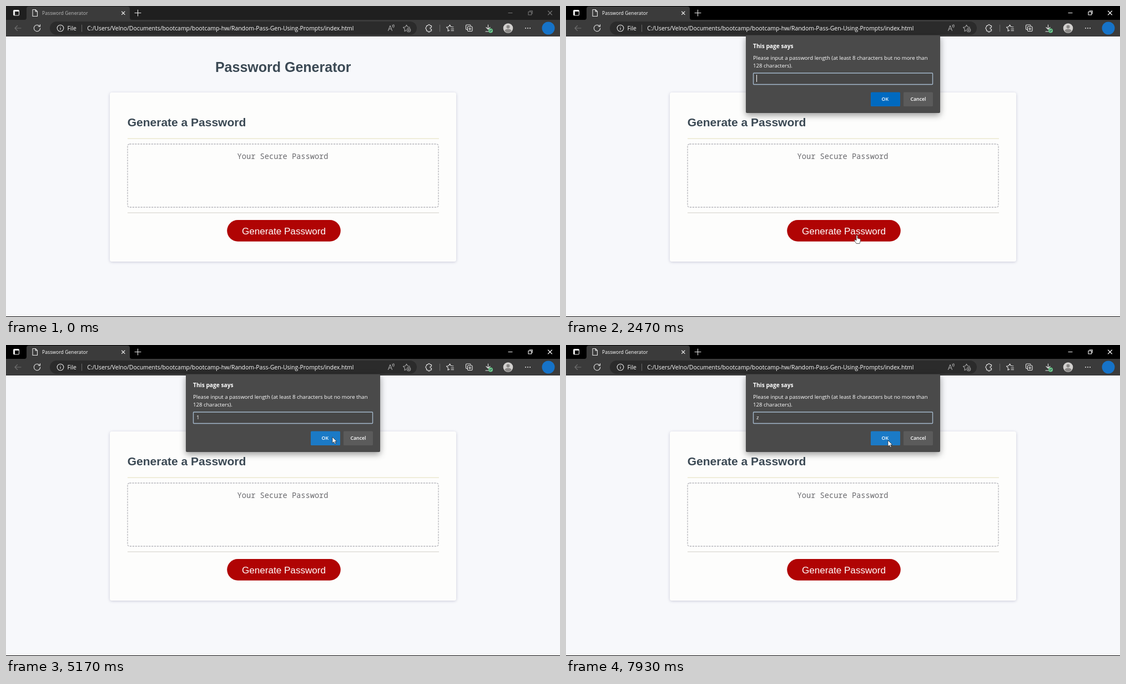
Recreate the animation shown at these times as an HTML page. Size 998 by 561 pixels, loop 8 s.

```html
<!DOCTYPE html>
<html lang="en">
<head>
<meta charset="utf-8">
<title>Password Generator</title>
<style>
  html, body { margin: 0; height: 100%; overflow: hidden; background: #f7f8fb; }
  svg { display: block; width: 100vw; height: 100vh; }
  text { font-family: "Open Sans", "Noto Sans", sans-serif; fill: #fff; white-space: pre; }
  .arial { font-family: "Liberation Sans", Arial, sans-serif; }
  .heading { font-weight: bold; fill: #3b4954; }
  .mono { font: 13.67px "Noto Sans Mono", "DejaVu Sans Mono", monospace; fill: #6a6a6e; }
  .mid { text-anchor: middle; }
  .line { fill: none; stroke: #e8e8e8; stroke-width: 1.1; stroke-linecap: round; stroke-linejoin: round; }
  .dim { stroke: #a4a4a4; }
  .off { stroke: #707070; }
  .dialog { filter: drop-shadow(0 4px 6px rgba(0, 0, 0, .4)); }
  .dialog text { font-size: 9.58px; }
  .dialog .title { font-size: 10.2px; font-weight: bold; }
  .dialog .label { font-size: 8.8px; font-weight: 600; text-anchor: middle; }
</style>
</head>
<body>
<svg viewBox="0 0 998 561" preserveAspectRatio="none">
  <!-- page -->
  <rect width="998" height="561" fill="#f7f8fb"/>
  <text class="arial heading mid" x="499.2" y="118.6" font-size="25">Password Generator</text>
  <rect x="187" y="156" width="624" height="305" rx="3.5" fill="#fdfdfc"
        style="filter:drop-shadow(0 1px 2.5px rgba(60,60,110,.24))"/>
  <text class="arial heading" x="218.7" y="216.6" font-size="21">Generate a Password</text>
  <path d="M219 239.300H780" stroke="#ebe8d0" stroke-width="1.5"/>
  <path d="M219 373H780" stroke="#e1dfd8" stroke-width="1.3"/>
  <rect x="219" y="249" width="560" height="114" rx="3.5" fill="none" stroke="#b5b5bb"
        stroke-width="1.3" stroke-dasharray="3.2 1.7"/>
  <text class="mono" x="416.6" y="275.5">Your Secure Password</text>
  <rect x="398.2" y="386" width="204.6" height="38.7" rx="19.35" fill="#b00404"/>
  <text class="arial mid" x="500.5" y="411.5" font-size="17.1">Generate Password</text>
  <rect y="560" width="998" height="1" fill="#050505"/>

  <!-- title bar -->
  <rect id="titleBar" width="998" height="26"/>
  <rect y="25" width="998" height="30" fill="#3b3b3b"/>
  <path d="M33 25q4 0 4-4V5q0-4 4-4H219q4 0 4 4V21q0 4 4 4Z" fill="#3b3b3b"/>
  <g class="line">
    <rect x="13.5" y="7.5" width="10" height="9.5" rx="1.5"/>
    <path d="M14 9H23M15 8V16" stroke-width="2.2"/>
    <path d="M48 6.500h5l3.500 3.500v8.500h-8.500zM53 6.500v3.500h3.500"/>
    <path d="M208.500 10l5.500 5.500m0-5.500l-5.500 5.500M232 12.500h11M237.500 7v11"/>
  </g>
  <text id="tabTitle" x="65" y="16" font-size="8.67">Password Generator</text>
  <path id="controls" class="line" d="M905 12.500h7M941 10.500h5.500v5.500H941zM943 8.700h5.200v5.300M976.500 9l7 7m0-7l-7 7"/>

  <!-- toolbar -->
  <rect x="79" y="28" width="661" height="24" rx="12" fill="#2b2b2b"/>
  <path class="line off" d="M27 40H16m4.500-4.500L16 40l4.500 4.500"/>
  <g class="line">
    <path d="M60.500 36.500A5.700 5.700 0 1 0 61.700 40M61.500 33.500v3.500h-3.500"/>
    <circle cx="98" cy="40" r="5.8"/><path d="M98 39.500v3M98 37v.2"/>
    <path d="M136.500 34v12M781.500 34v12" stroke="#666"/>
    <path d="M757.500 35.500h2.500a2 2 0 0 1 4 0h2.500v3h-1a1.600 1.600 0 0 0 0 3.200h1v3.300h-2.500a2 2 0 0 1-4 0h-2.500v-3a2.200 2.200 0 0 1 0-4.200z"/>
    <path d="M806 38l-4.500-.5-2-3.500-2 3.500-4 .8 3 3-.5 4 3-1.500M802 41.500h4.500M802 44.500h4.500"/>
    <path d="M831.500 42.500h-1.500q-1.500 0-1.500-1.500v-5.500q0-1.500 1.500-1.500h5.500q1.500 0 1.500 1.500"/>
    <rect x="831.5" y="37" width="8.5" height="8.5" rx="1.5"/><path d="M835.700 39v4.500m-2.200-2.200h4.500"/>
    <path d="M868.500 34v8m-3.500-3.500l3.500 3.500 3.500-3.500M864 46h5"/>
    <path d="M936 40h.1m3.900 0h.1m3.900 0h.1" stroke-width="1.8"/>
  </g>
  <circle cx="873" cy="44.5" r="4" fill="#6cc58a"/>
  <path d="M871 44.500l1.500 1.500 2.500-3" fill="none" stroke="#234"/>
  <path class="line dim" d="M688.500 44.500l3.500-9 3.500 9m-6-3h5M696 34.500q1.500 1.500 0 3.500M698 33.500q2.500 2.500 0 5.500"/>
  <path class="line dim" d="M727.500 38.500l-4-.7-2-3.500-2 3.500-4 .8 3 3-.5 4 2.500-1.300"/>
  <g class="line dim"><circle cx="725.5" cy="43.5" r="3.2"/><path d="M725.500 42v3m-1.500-1.500h3"/></g>
  <circle cx="904.5" cy="40" r="8.8" fill="#d2d0ce"/>
  <circle cx="904.5" cy="37.5" r="3" fill="#8a8886"/>
  <path d="M898.500 45.500q0-4 6-4t6 4q-6 5-12 0" fill="#8a8886"/>
  <circle cx="977" cy="40" r="11.5" fill="#1673c8"/>
  <text x="110.5" y="43.7" font-size="10.4">File</text>
  <text x="146.2" y="43.7" font-size="10.43">C:/Users/Velno/Documents/bootcamp/bootcamp-hw/Random-Pass-Gen-Using-Prompts/index.html</text>

  <!-- dialogs -->
  <g id="alert" class="dialog">
    <rect x="324" y="53" width="350" height="99" rx="2" fill="#4a4a4a"/>
    <text class="title" x="337" y="75.8">This page says</text>
    <text x="337" y="97.3">Please enter a number between 8 and 128.</text>
    <rect id="alertOk" x="608" y="114.4" width="53" height="25.6" rx="1.5"/>
    <text class="label" x="634.5" y="130.4">OK</text>
  </g>
  <g id="prompt" class="dialog">
    <rect x="324" y="53" width="350" height="140" rx="2" fill="#4a4a4a"/>
    <text class="title" x="337" y="75.8">This page says</text>
    <text x="337" y="97.3">Please input a password length (at least 8 characters but no more than</text>
    <text x="337" y="111.3">128 characters).</text>
    <rect x="337.5" y="121" width="323" height="20.5" rx="1" fill="#464646" stroke="#a3b7ca" stroke-width="1.4"/>
    <text id="entry" x="343" y="134.3"></text>
    <rect id="caret" y="124" width="1" height="13" fill="#fff"/>
    <rect id="promptOk" x="549" y="155.4" width="53" height="25.6" rx="1.5"/>
    <rect x="608" y="155.4" width="53" height="25.6" rx="1.5" fill="#5b5b5b"/>
    <text class="label" x="574.8" y="171.4">OK</text>
    <text class="label" x="634.5" y="171.4">Cancel</text>
  </g>

  <!-- pointers, hot spot at 0,0 -->
  <g id="pointer" stroke="#1c1c1c" stroke-width=".7" fill="#fff" stroke-linejoin="round">
    <path id="arrow" d="M0 0V11L2.600 8.700 4.400 12.500 6.200 11.700 4.500 8H8Z"/>
    <path id="hand" d="M-1 1.200Q0-.5 1.200 1.200V6L5.500 7Q7 7.500 6.500 10L5 15.500H-1L-4.500 10Q-4.500 8-2.500 8.800L-1 10Z"/>
    <path id="ibeam" d="M-3-5h2q1 0 1 1 0-1 1-1h2M0-4V4M-3 5h2q1 0 1-1 0 1 1 1h2" fill="none" stroke="#ddd" stroke-width="1"/>
  </g>
</svg>
<script>
const LOOP = 8000;
const $ = id => document.getElementById(id);
const clamp = v => Math.max(0, Math.min(1, v));
const show = (id, on) => $(id).setAttribute('visibility', on ? 'visible' : 'hidden');
const inside = ([x, y], left, top, w, h) => x >= left && x <= left + w && y >= top && y <= top + h;

const FOCUS = 900;
const sessions = [
  { open: 2110, close: 5400, typedAt: 3330, entry: '1' },
  { open: 6330, close: Infinity, typedAt: 7270, entry: 'z' }
];
const alertSpan = { open: 5400, close: 6330 };

// time, x, y
const route = [
  [880, 1004, 60], [1260, 727, 153], [1370, 727, 153], [1670, 530, 405], [1880, 524, 413],
  [2490, 524, 413], [3030, 490, 203], [4050, 490, 203], [4330, 500, 178], [4370, 500, 178],
  [4830, 580, 168], [5100, 588, 166], [5430, 588, 166], [6100, 631, 130], [6490, 631, 130],
  [7000, 598, 172], [7070, 598, 172], [7300, 581, 173], [7770, 580, 172]
];

function pointerAt(t) {
  const next = route.findIndex(key => key[0] > t);
  if (next === 0) return route[0].slice(1);
  if (next < 0) return route.at(-1).slice(1);
  const [t0, x0, y0] = route[next - 1], [t1, x1, y1] = route[next];
  const p = (t - t0) / (t1 - t0), e = p * p * (3 - 2 * p);
  return [x0 + (x1 - x0) * e, y0 + (y1 - y0) * e];
}

// Slides down while fading in, then up while fading out.
function placeDialog(id, span, t) {
  const rise = clamp((t - span.open) / 180), fall = clamp((t - span.close) / 175);
  const scale = 1 + .014 * fall;
  const y = -20 * (1 - rise) ** 2 - 20 * fall;
  $(id).setAttribute('transform', `translate(${499 * (1 - scale)} ${y}) scale(${scale} 1)`);
  $(id).setAttribute('opacity', Math.min(1, rise * 2) * (1 - fall ** 4));
}

function draw(t) {
  const focused = t >= FOCUS;
  $('titleBar').setAttribute('fill', focused ? '#000' : '#1f1f1f');
  $('tabTitle').style.fill = focused ? '#fff' : '#b8b8b8';
  $('controls').style.stroke = focused ? '#fff' : '#777';

  const session = t < sessions[1].open ? sessions[0] : sessions[1];
  placeDialog('prompt', session, t);
  placeDialog('alert', alertSpan, t);

  const typed = t >= session.typedAt;
  const blinkStart = typed ? session.typedAt : session.open + 120;
  $('entry').textContent = typed ? session.entry : '';
  $('caret').setAttribute('x', typed ? 348.5 : 343);
  $('caret').setAttribute('opacity', (t - blinkStart) % 1000 < 500 ? 1 : 0);

  const pos = pointerAt(t);
  const active = t >= session.open && t < session.close;
  const overButton = inside(pos, 398, 386, 205, 39);
  const overInput = active && inside(pos, 337, 120, 324, 22);
  const okFill = hovered => hovered ? '#1b7ac6' : '#006ac0';
  $('promptOk').setAttribute('fill', okFill(inside(pos, 549, 155, 53, 26)));
  $('alertOk').setAttribute('fill', okFill(inside(pos, 608, 114, 53, 26)));
  $('pointer').setAttribute('transform', `translate(${pos.map(Math.round)})`);
  show('hand', overButton);
  show('ibeam', overInput);
  show('arrow', !overButton && !overInput);
}

const start = performance.now();
function frame() {
  draw((performance.now() - start) % LOOP);
  requestAnimationFrame(frame);
}
frame();
</script>
</body>
</html>
```
